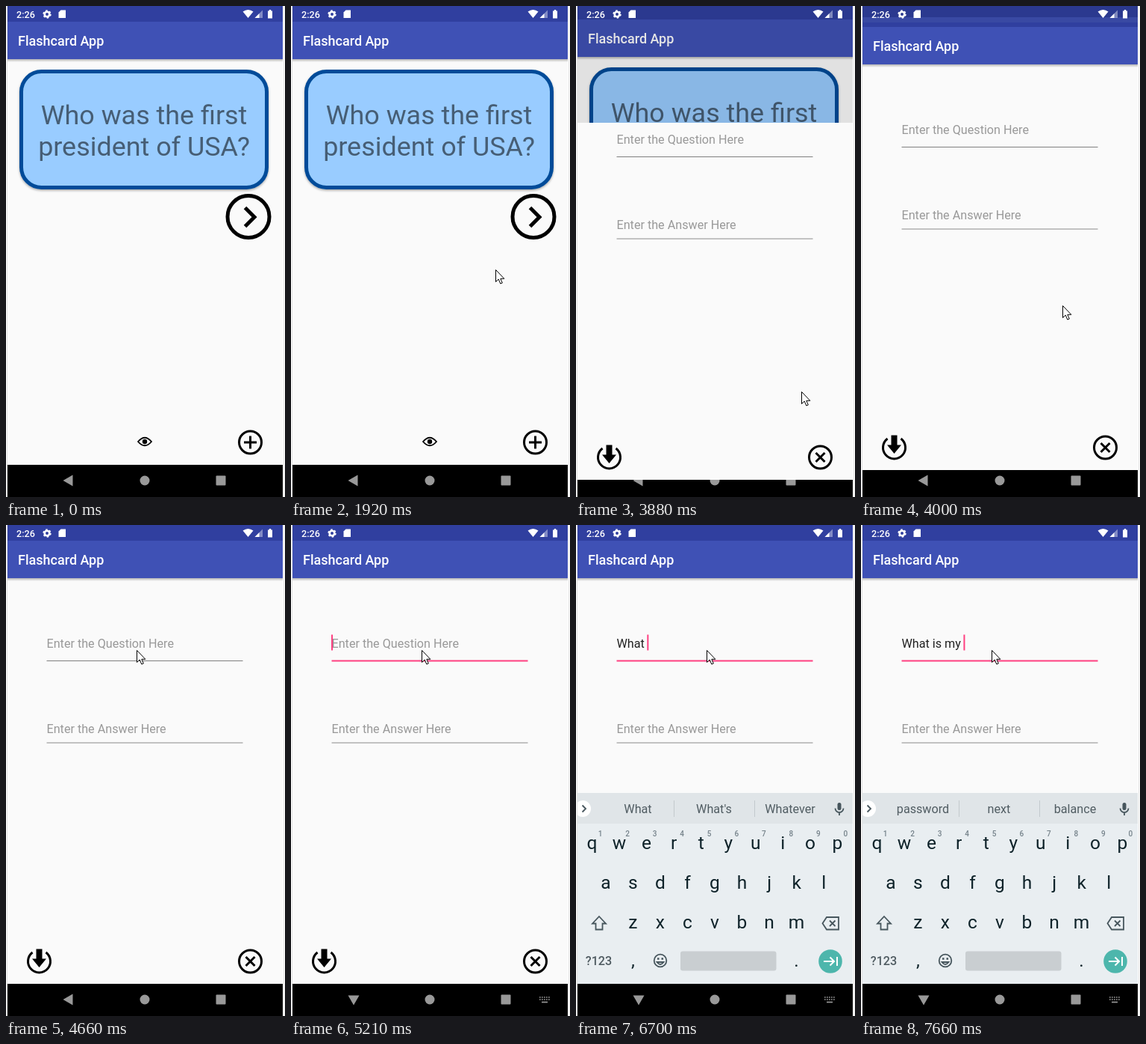
Animation of 374x656 px, one loop 8000 ms. Source, as an HTML page:

```html
<!DOCTYPE html>
<html lang="en">
<head>
<meta charset="utf-8">
<title>Flashcard App</title>
<style>
html, body { margin: 0; width: 100%; height: 100%; overflow: hidden; background: #fff; }
svg { display: block; width: 374px; height: 656px; font-family: Roboto, sans-serif; }
.line { fill: none; stroke: #000; stroke-width: 3; }
.title { font-size: 18px; font-weight: 500; fill: #fff; }
.card { font-size: 35.9px; fill: #000; fill-opacity: .54; text-anchor: middle; }
.field { font-size: 16.16px; fill: #212121; }
.hint { fill: #999; }
.word { font-size: 16.16px; fill: #505c62; text-anchor: middle; }
.key { font-size: 24.5px; fill: #0e2229; text-anchor: middle; }
.digit { font-size: 10px; font-weight: 500; fill: #75828a; text-anchor: middle; }
.icon { fill: none; stroke: #47565d; stroke-width: 1.8; }
</style>
</head>
<body>
<svg viewBox="0 0 374 656">
  <defs>
    <linearGradient id="fade" x2="0" y2="1">
      <stop stop-color="#000" stop-opacity=".28"/>
      <stop offset="1" stop-color="#000" stop-opacity="0"/>
    </linearGradient>
    <filter id="soft" x="-10%" y="-10%" width="120%" height="125%">
      <feDropShadow dx="0" dy="1.5" stdDeviation="1.6" flood-opacity=".35"/>
    </filter>
    <clipPath id="reveal"><rect id="revealBox" x="2" width="369" height="656"/></clipPath>
    <clipPath id="screen"><rect x="2" width="369" height="613"/></clipPath>
    <g id="frame">
      <rect x="2" y="-6" width="369" height="619" fill="#fafafa"/>
      <rect x="2" y="71" width="369" height="4" fill="url(#fade)"/>
      <rect x="2" y="-6" width="369" height="28" fill="#303f9f"/>
      <rect x="2" y="21" width="369" height="50" fill="#3f51b5"/>
      <text class="title" x="16" y="53">Flashcard App</text>
    </g>
  </defs>

  <path d="M1.5 0V656M372.5 0V656" stroke="#e2e2e2"/>

  <g clip-path="url(#screen)">
    <g id="main">
      <use href="#frame"/>
      <rect x="20.5" y="87.500" width="329" height="155" rx="27" fill="#99ccff" stroke="#004c99" stroke-width="5" filter="url(#soft)"/>
      <text class="card" x="185" y="158">Who was the first</text>
      <text class="card" x="185" y="200">president of USA?</text>
      <g class="line">
        <circle cx="325" cy="281.500" r="28" stroke-width="5"/>
        <path d="M320.500 269.500L333 282 320.500 294.500" stroke-width="5"/>
        <path d="M177 582Q186 571.500 195 582Q186 592.500 177 582Z" stroke-width="1.800"/>
        <circle cx="327.500" cy="583" r="15"/>
        <path d="M319 583H336M327.500 574.500V591.500"/>
      </g>
      <circle cx="186" cy="582" r="3.200"/>
    </g>
    <rect id="dim" x="2" width="369" height="613"/>
  </g>

  <rect x="2" y="613" width="369" height="43"/>
  <g fill="#999">
    <path id="back" d="M76.500 634L89.500 626.500V641.500Z"/>
    <circle cx="186" cy="634" r="6.500"/>
    <rect x="281.500" y="627.500" width="13" height="13" rx="1"/>
    <g id="imeIcon" fill="none" stroke="#999" stroke-width="1.700">
      <path d="M333 631H347M333 634H347" stroke-dasharray="1.700 1.300"/>
      <path d="M336 637.500H344"/>
    </g>
  </g>

  <g clip-path="url(#reveal)">
    <g id="sheet">
      <use href="#frame"/>
      <text class="field hint" id="hint" x="54.500" y="163.500">Enter the Question Here</text>
      <text class="field" id="typed" x="54.500" y="163.500"></text>
      <rect id="compose" y="165" height="1" fill="#212121"/>
      <rect id="caret" y="146.500" width="2" height="21" fill="#ff4081"/>
      <path id="rule" d="M54.500 181.500H317.500"/>
      <text class="field hint" x="54.500" y="277.500">Enter the Answer Here</text>
      <path d="M54.500 291H317.500" stroke="#8c8c8c" stroke-width="1.200"/>
      <g class="line">
        <path d="M35.500 571A15 15 0 1 0 53.500 571"/>
        <circle cx="327.500" cy="583" r="15"/>
        <path d="M321.500 577L333.500 589M333.500 577L321.500 589"/>
      </g>
      <path d="M40.500 566.500H48.500V579.500H54L44.500 591 35 579.500H40.500Z"/>
    </g>
  </g>

  <g clip-path="url(#screen)">
    <g id="keyboard">
      <rect x="2" y="358" width="369" height="255" fill="#e9eef1"/>
      <rect x="2" y="358" width="369" height="41" fill="#e0e5e8"/>
      <path d="M131.500 368V390M239.500 368V390" stroke="#c3c9cd"/>
      <circle cx="9" cy="379" r="11" fill="#fff"/>
      <path class="icon" d="M8.500 374.500L13 379 8.500 383.500" stroke="#222"/>
      <rect x="350.500" y="371" width="5" height="10" rx="2.500" fill="#47565d"/>
      <path class="icon" d="M347.500 378.500A5.500 5.500 0 0 0 358.500 378.500M353 384V388" stroke-width="1.500"/>
      <g id="words"></g>
      <g id="keys"></g>
      <path class="icon" d="M31 523L40 532.500H35.500V540.500H26.500V532.500H22Z"/>
      <path class="icon" d="M336 524H352V540.500H336L330.500 532.200ZM340 528.500L347.500 536M347.500 528.500L340 536"/>
      <text class="word" x="30.500" y="588" font-weight="500">?123</text>
      <circle class="icon" cx="113" cy="582" r="8.300"/>
      <path class="icon" d="M108.500 584Q113 590 117.500 584Z" stroke-width="1"/>
      <path d="M109 579.500H111.500M114.500 579.500H117" stroke="#47565d" stroke-width="2.400"/>
      <rect x="140" y="569.500" width="128.500" height="26" rx="3" fill="#c9ced1"/>
      <circle cx="341" cy="583" r="15.800" fill="#4db6ac"/>
      <path d="M332 583H346M340.500 577.500L346 583 340.500 588.500M350 577V589" fill="none" stroke="#fff" stroke-width="2"/>
    </g>
  </g>

  <g fill="#fff">
    <text x="14" y="15.500" font-size="12.600" font-weight="500">2:26</text>
    <circle cx="55" cy="11" r="3.300" fill="none" stroke="#fff" stroke-width="2.600"/>
    <circle cx="55" cy="11" r="4.800" fill="none" stroke="#fff" stroke-width="1.800" stroke-dasharray="2.500 2.527"/>
    <path d="M73.500 5.500H80V16H70.500V8.500Z"/>
    <path d="M317.500 7.500Q324.500 2.500 331.500 7.500L324.500 16Z"/>
    <path d="M333.500 16L344 5.500V16Z" opacity=".4"/>
    <path d="M333.500 16L339.500 10V16Z"/>
    <path d="M351 6.500H352.800V5H355.200V6.500H357V16.500H351Z"/>
  </g>

  <path id="pointer" d="M.5 .5V16.500L4.200 13 6.800 19 9.300 18 6.800 12.300H11.800Z" fill="#fff" stroke="#000"/>
</svg>

<script>
const LOOP = 8000;
const $ = id => document.getElementById(id);
const set = (el, attrs) => { for (const k in attrs) el.setAttribute(k, attrs[k]); };
const show = (el, on) => set(el, { visibility: on ? 'visible' : 'hidden' });

function addText(parent, cls, x, y, str = '') {
  const el = document.createElementNS('http://www.w3.org/2000/svg', 'text');
  set(el, { class: cls, x, y });
  el.textContent = str;
  parent.appendChild(el);
  return el;
}

const addRow = (letters, x, y, cls = 'key') =>
  [...letters].forEach((ch, i) => addText($('keys'), cls, x + i * 36.55, y, ch));
addRow('qwertyuiop', 21.5, 433);
addRow('1234567890', 32.5, 415.5, 'digit');
addRow('asdfghjkl', 39.8, 485.5);
addRow('zxcvbnm', 76.3, 538.5);
addText($('keys'), 'key', 76.5, 590, ',');
addText($('keys'), 'key', 295.5, 590, '.');
const slots = [83, 185, 287].map(x => addText($('words'), 'word', x, 385));

// Each track holds [start ms, ...values]; values stay until the next start.
const pointer = [
  [560, 271, 569], [680, 267, 495], [800, 276, 435], [950, 276, 396], [1070, 267, 354],
  [1530, 271, 350], [1650, 274, 349], [1920, 274, 352], [2040, 278, 400], [2160, 284, 454],
  [2310, 294, 522], [2430, 294, 584], [2580, 293, 606], [2700, 292, 619], [2850, 296, 592],
  [2970, 303, 562], [3090, 309, 540], [3240, 314, 556], [3360, 318, 569], [3480, 319, 573],
  [3880, 302, 515], [4000, 270, 400], [4120, 230, 290], [4270, 195, 212], [4390, 176, 171],
  [4540, 175, 169], [4660, 175, 167]
];
// start, sheet offset, reveal top, main offset, dim
const slide = [
  [0, 0, 656, 0, 0], [3880, 20, 156, -3, .1], [4000, 7, 22, -6, .1], [4120, 1, 0, -6, .1], [4270, 0, 0, 0, 0]
];
// start, offset, opacity
const rise = [[0, 0, 0], [5360, 14, .7], [5480, 0, 1]];
const turn = [[0, 0], [5090, -45], [5210, -90]];
// start, text, start of the word being composed
const typing = [
  [0, '', 0], [6130, 'W', 0], [6430, 'Wh', 0], [6580, 'What', 0], [6700, 'What ', 5],
  [7000, 'What i', 5], [7120, 'What is', 5], [7270, 'What is ', 8],
  [7420, 'What is m', 8], [7540, 'What is my', 8], [7660, 'What is my ', 11]
];
const suggest = [
  [0, 'thanks', 'I', 'we'], [6280, 'We', 'W', 'What'], [6430, 'Why', 'What', 'Who'],
  [6580, 'What', 'What\'s', 'Whatever'], [6850, 'is', 'the', 'are'], [7000, 'is', 'I', 'if'],
  [7120, 'is', 'it', 'issues'], [7270, 'your', 'the', 'a'], [7420, 'me', 'my', 'more'],
  [7540, 'my', 'mine', 'myself'], [7660, 'password', 'next', 'balance']
];

function at(track, t) {
  let hit = null;
  for (const step of track) if (step[0] <= t) hit = step;
  return hit && hit.slice(1);
}
const move = (x, y) => ({ transform: `translate(${x} ${y})` });

function draw(t) {
  const p = at(pointer, t);
  show($('pointer'), p);
  if (p) set($('pointer'), move(...p));

  const [sheetY, top, mainY, dim] = at(slide, t);
  set($('sheet'), move(0, sheetY));
  set($('revealBox'), { y: top });
  set($('main'), move(0, mainY));
  set($('dim'), { opacity: dim });

  const [keyY, alpha] = at(rise, t);
  set($('keyboard'), { ...move(0, keyY), opacity: alpha });
  set($('back'), { transform: `rotate(${at(turn, t)[0]} 84 634)` });
  show($('imeIcon'), t >= 5090);

  const [str, from] = at(typing, t);
  const typed = $('typed');
  typed.textContent = str.replace(/ /g, '\u00a0');
  const width = str ? typed.getComputedTextLength() : 0;
  const start = from ? typed.getSubStringLength(0, from) : 0;
  set($('compose'), { x: 54.5 + start, width: Math.max(0, width - start) });
  set($('caret'), { x: 54 + width });
  show($('caret'), (t >= 5090 && t < 5630) || t >= 6130);
  show($('hint'), !str);

  const focus = t >= 4970;
  set($('rule'), { stroke: focus ? '#ff4081' : '#808080', 'stroke-width': focus ? 1.8 : 1.2 });
  at(suggest, t).forEach((word, i) => { slots[i].textContent = word; });
}

const begin = performance.now();
function tick() {
  draw((performance.now() - begin) % LOOP);
  requestAnimationFrame(tick);
}
tick();
</script>
</body>
</html>
```
